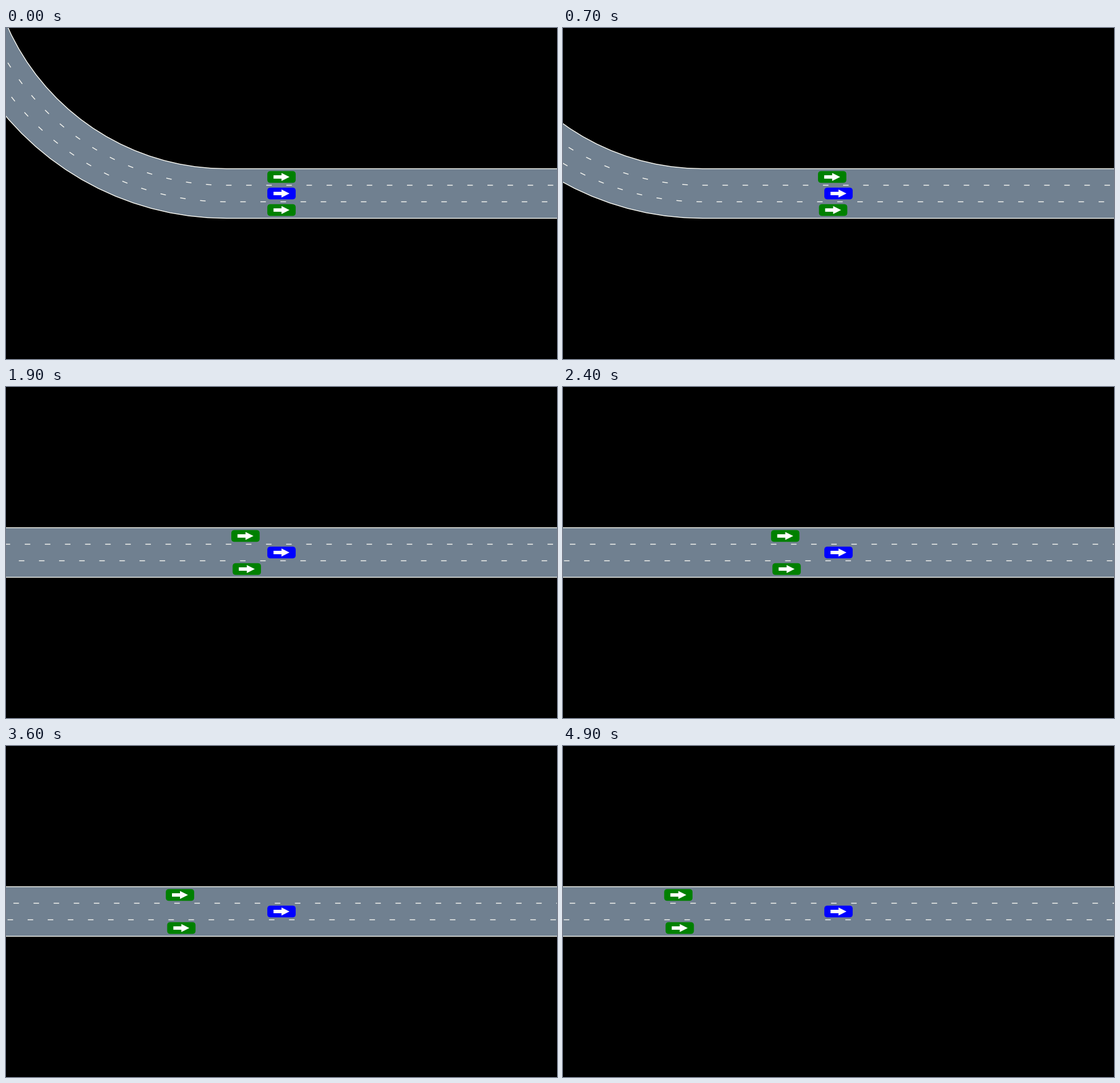
These frames come from a looping animation (966 px wide and 580 px high, 5000 ms). A matplotlib script:

```python
import numpy as np
import matplotlib.pyplot as plt
from matplotlib.animation import FuncAnimation
from matplotlib.collections import LineCollection
from matplotlib.patches import FancyBboxPatch, Polygon

W, H, DPI = 966, 580, 100
FRAMES, INTERVAL = 50, 100

M = 9.66                      # pixels per metre
LANE = 3 * M
TOP = H / 2 - 1.5 * LANE      # upper edge of the road
JOINT = 386.3                 # where the bend meets the straight at t = 0
RADIUS = 43.5 * M             # bend radius of the upper edge
CENTER_Y = TOP - RADIUS
STRAIGHT = 2400
DASH, PERIOD = 9.66, 35.25

ASPHALT, MARKING = "#708090", "#f8f8f2"
CAR_LENGTH, CAR_WIDTH = 49.7, 20.6


def travelled(t, speed, lag, rate):
    """Distance covered while speed settles exponentially."""
    return speed * t - lag * (1 - np.exp(-rate * t))


def lane_line(k):
    """Polyline of the k-th lane border: quarter bend, then straight."""
    r = RADIUS + k * LANE
    a = np.linspace(np.pi / 2, 0, 25)
    bend = np.column_stack([JOINT - r * np.sin(a), CENTER_Y + r * np.cos(a)])
    return np.vstack([bend, [JOINT + STRAIGHT, TOP + k * LANE]])


def along(k, x):
    """Point at signed distance x from the joint on lane border k."""
    r = RADIUS + k * LANE
    a = max(-x, 0) / r
    return JOINT + max(x, 0) - r * np.sin(a), CENTER_Y + r * np.cos(a)


def dashes(k, first):
    start = first - JOINT
    return [[along(k, start + n * PERIOD + d) for d in (-DASH / 2, 0, DASH / 2)]
            for n in range(-18, 64)]


fig = plt.figure(figsize=(W / DPI, H / DPI), dpi=DPI, facecolor="black")
ax = fig.add_axes([0, 0, 1, 1])
ax.set_xlim(0, W)
ax.set_ylim(H, 0)
ax.axis("off")

upper, lower = lane_line(0), lane_line(3)
surface = np.vstack([upper, lower[::-1]])
marks = [upper, lower] + dashes(1, 390.6) + dashes(2, 380.3)
marks = [np.array(m) for m in marks]

road = ax.add_patch(Polygon(surface, fc=ASPHALT, ec="none", snap=False))
lines = ax.add_collection(LineCollection(
    marks, colors=MARKING, linewidths=1.45 * 72 / DPI, capstyle="butt"))
lines.set_snap(False)

ARROW = np.array([(-14, -3), (0, -3), (0, -7), (14, 0), (0, 7), (0, 3), (-14, 3)])


class Car:
    def __init__(self, lane, color):
        self.y = TOP + (lane + 0.5) * LANE
        self.body = ax.add_patch(FancyBboxPatch(
            (0, self.y - CAR_WIDTH / 2), CAR_LENGTH, CAR_WIDTH,
            boxstyle="round,pad=0,rounding_size=5.5",
            fc=color, ec="none", snap=False, zorder=3))
        self.arrow = ax.add_patch(Polygon(
            ARROW, fc="white", ec="none", snap=False, zorder=4))

    def move(self, x):
        self.body.set_x(x - CAR_LENGTH / 2)
        self.arrow.set_xy(ARROW + (x, self.y))


cars = [Car(0, "#008000"), Car(1, "#0000ff"), Car(2, "#008000")]


def update(i):
    t = i * INTERVAL / 1000
    ego = travelled(t, 280.1, 161.4, 0.59)
    positions = (travelled(t, 193.1, 6.9, 1.7), ego,
                 travelled(t, 193.1, 4.5, 1.7))
    for car, s in zip(cars, positions):
        car.move(W / 2 + s - ego)
    road.set_xy(surface - (ego, 0))
    lines.set_segments([m - (ego, 0) for m in marks])
    return [road, lines]


anim = FuncAnimation(fig, update, frames=FRAMES, interval=INTERVAL,
                     repeat=True, repeat_delay=0, blit=False)
plt.show()
```
